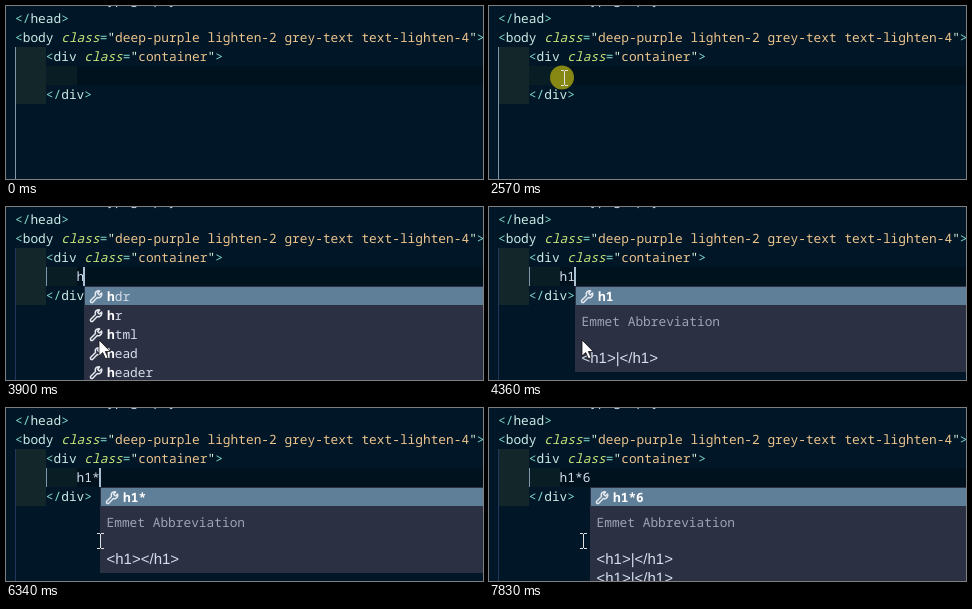
Write an HTML page that moves like this. It is 477 px wide and 173 px high and loops after 8000 ms.

```html
<!DOCTYPE html>
<html lang="en">
<head>
<meta charset="utf-8">
<title>Editor abbreviation</title>
<style>
html, body { margin: 0; width: 100%; height: 100%; overflow: hidden; background: #011627; }
svg { display: block; }
text { font: 500 12.83px "Noto Sans Mono", monospace; fill: #d6deeb; white-space: pre; text-rendering: geometricPrecision; }
.p { fill: #7fdbca; }
.t { fill: #caece6; }
.a { fill: #c5e478; font-style: italic; }
.q { fill: #d9f5dd; }
.s { fill: #ecc48d; }
.b { fill: #fff; font-weight: bold; }
.g { fill: #9ea3b4; }
.d { font: 15px "Liberation Sans", sans-serif; }
</style>
</head>
<body>
<svg width="477" height="173" viewBox="0 0 477 173">
  <path fill="#132629" d="M9 41h31v57H9z"/>
  <path fill="#01121f" d="M40 60h437v19H40z"/>
  <path fill="#081e24" d="M40 60h31v19H40z"/>
  <g id="code"></g>
  <g id="live"></g>
</svg>
<script>
const CHAR = 7.7, LEFT = 9, LOOP = 8000;
const $ = id => document.getElementById(id);
const esc = s => s.replace(/</g, '&lt;');
const span = (cls, s) => `<tspan class="${cls}">${esc(s)}</tspan>`;
const text = (x, y, inner) => `<text x="${x}" y="${y}">${inner}</text>`;
const column = n => LEFT + n * CHAR;
const open = (tag, cls) => span('p', '<') + span('t', tag) + span('a', ' class') + span('p', '=') +
  span('q', '"') + span('s', cls) + span('q', '"') + span('p', '>');
const close = tag => span('p', '</') + span('t', tag) + span('p', '>');

$('code').innerHTML =
  text(column(4), -2, span('p', '<') + span('t', 'title') + span('p', '>') + 'Typography' + close('title')) +
  text(LEFT, 17, close('head')) +
  text(LEFT, 36, open('body', 'deep-purple lighten-2 grey-text text-lighten-4')) +
  text(column(4), 55, open('div', 'container')) +
  text(column(4), 93, close('div'));

// Latest entry whose start time has passed
const at = (list, t) => list.filter(e => e[0] <= t).pop()?.[1];

const typed = [[0, ''], [3780, 'h'], [4260, 'h1'], [6310, 'h1*'], [7280, 'h1*6']];
const popups = [[3900, 'h'], [4360, 'h1'], [6340, 'h1*'], [7380, 'h1*6']];
const blinkStarts = [2570, 3780, 4315, 6310, 7280, 7325].map(t => [t, t]);
// Start and end time, start and end point, ease-out powers for x and y
const pointerMoves = [
  [1320, 1810, 335, 164, 65, 66, 5.3, 4.2],
  [2210, 2390, 65, 66, 75, 72, 2, 2],
  [2700, 2930, 75, 72, 94, 133, 2, 2],
];

function pointer(t) {
  const [t0, t1, x0, y0, x1, y1, px, py] = pointerMoves.filter(m => m[0] <= t).pop();
  const rest = 1 - Math.min(1, (t - t0) / (t1 - t0));
  return [x1 + (x0 - x1) * rest ** px, y1 + (y0 - y1) * rest ** py].map(Math.round);
}

const wrench = y => `<g transform="translate(5 ${y})" fill="none" stroke="#e4e8ef" stroke-linejoin="round">
  <path stroke-width="1.5" d="M1.5 10.5L6.5 5.5Q5.5 2 8.5 1Q9.5 .6 10.6 1L8.6 3.2L10.3 5L12.6 3Q13.3 6 11 7.3Q9.7 8 8.3 7.5L3.5 12.5Q1 12.8 1.5 10.5Z"/></g>`;

function popup(word) {
  const row = (s, i) => wrench(4 + 19 * i) + text(23, 15 + 19 * i, span('b', s[0]) + s.slice(1));
  const bodies = { 'h1': ['<h1>|</h1>'], 'h1*': ['<h1></h1>'], 'h1*6': ['<h1>|</h1>', '<h1>|</h1>'] };
  const body = bodies[word];
  const height = body?.length === 1 ? 86 : 110;
  const content = body
    ? wrench(4) + text(23, 15, span('b', word)) + text(6.5, 40, span('g', 'Emmet Abbreviation')) +
      body.map((s, i) => text(6.5, 77 + 19 * i, span('d', s))).join('')
    : ['hdr', 'hr', 'html', 'head', 'header'].map(row).join('');
  return `<g transform="translate(${Math.round(column(8 + word.length))} 79)">
    <path fill="#2c3043" d="M0 0h430v${height}H0z"/><path fill="#5f7e97" d="M1 1h428v18H1z"/>${content}</g>`;
}

function scene(t) {
  const word = at(typed, t), hint = at(popups, t), blink = at(blinkStarts, t);
  const dim = '#1f385c', lit = '#7e97ac';
  let out = `<path fill="${word ? dim : lit}" d="M9 41h1v132H9z"/>` + text(column(8), 74, word);
  if (word) out += `<path fill="${lit}" d="M40 60h1v19h-1z"/>`;
  if (hint) out += popup(hint);
  if (blink && (t - blink) % 1010 < 505)
    out += `<rect x="${Math.round(column(8 + word.length)) - 1}" y="60" width="2" height="19" fill="#a9c0d2"/>`;
  if (t >= 2570 && t < 2700) out += '<circle cx="73" cy="71.5" r="12" fill="#878813"/>';
  if (t >= 1320) {
    const [x, y] = pointer(t);
    const arrow = t >= 3900 && t < 6280;
    out += `<g transform="translate(${x} ${y})">` + (arrow
      ? '<path fill="#fff" stroke="#111" stroke-width=".8" d="M-1 0V16l3.7-3.5 2.8 6.3 2.6-1.2-2.8-6.1h5z"/>'
      : '<path fill="none" stroke="#e0e0e0" d="M-3 -7.5h3M1 -7.5h3M.5 -7V7M-3 7.5h3M1 7.5h3"/>') + '</g>';
  }
  return out;
}

let shown;
function draw() {
  const next = scene(performance.now() % LOOP);
  if (next !== shown) $('live').innerHTML = shown = next;
  requestAnimationFrame(draw);
}
draw();
</script>
</body>
</html>
```
